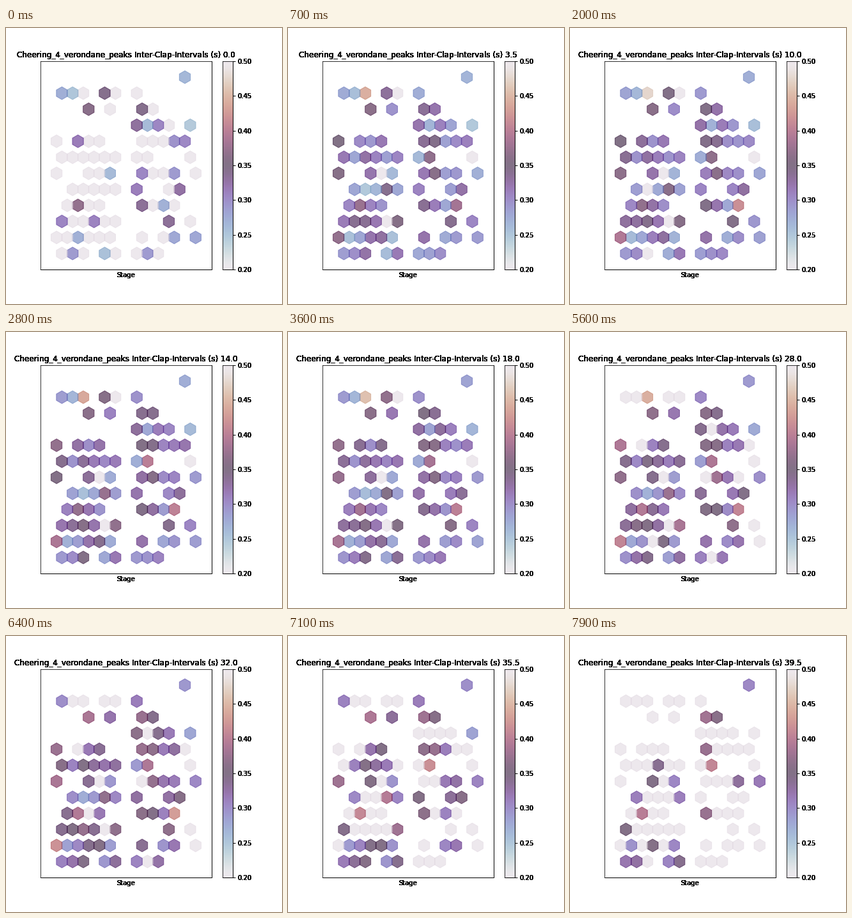
A matplotlib script that plays this animation: 432 px wide and 432 px high, repeating every 8400 ms.

```python
import numpy as np
import matplotlib.pyplot as plt
from matplotlib.animation import FuncAnimation

SIZE = 432
STEPS, HOLD = 80, 4          # the last picture is held for a few extra ticks
SILENT = 0.20
TITLE = "Cheering_4_verondane_peaks Inter-Clap-Intervals (s) "

# Hall layout, bottom row first: blocks of seats as first and last half-seat column.
HALL = [
    [(4, 8), (12, 14), (18, 22)],
    [(3, 13), (19, 19), (23, 25), (29, 29)],
    [(4, 14), (24, 24), (28, 28)],
    [(5, 11), (19, 25)],
    [(6, 14), (18, 18), (24, 26)],
    [(3, 3), (9, 13), (19, 25), (29, 29)],
    [(4, 14), (18, 20), (28, 28)],
    [(3, 3), (7, 11), (19, 27)],
    [(18, 24), (28, 28)],
    [(9, 9), (13, 13), (19, 21)],
    [(4, 8), (12, 14), (18, 18)],
    [(27, 27)],
]

rng = np.random.default_rng(12)
times = np.arange(STEPS) * 0.5


def clap_track():
    """Intervals of one listener: join in, slow down a little, drop out."""
    tempo = 0.25 + rng.gamma(3.3, 0.02)
    start = rng.uniform(0.2, 2.8) if rng.random() < 0.63 else 0
    fate = rng.random()
    if fate < 0.05:
        stop = 0
    elif fate < 0.25:
        stop = rng.uniform(18, 31)
    elif fate < 0.77:
        stop = rng.uniform(32.2, 39)
    else:
        stop = 40
    wobble = np.convolve(rng.normal(0, 0.08, STEPS + 2), [0.25, 0.5, 0.25], "valid")
    track = tempo + 0.001 * (times - 14) + wobble * (tempo - SILENT)
    clapping = (times >= start) & (times < stop) & (rng.random(STEPS) > 0.015)
    return np.where(clapping, track, SILENT)


# Drawn from right to left, so that each seat overlaps its right neighbour.
seats = np.array([(col, row)
                  for row, blocks in enumerate(HALL, 1)
                  for first, last in reversed(blocks)
                  for col in range(last, first - 1, -2)])
tracks = np.array([clap_track() for _ in seats])

plt.rcParams["font.family"] = "DejaVu Sans"
fig = plt.figure(figsize=(6, 6), dpi=72, facecolor="white")


def pixel_axes(x, y, w, h):
    return fig.add_axes([x / SIZE, y / SIZE, w / SIZE, h / SIZE])


def draw_frame(axes):
    """Left and top lines are slightly lighter than right and bottom."""
    for side, width in dict(left=0.8, top=0.8, right=1, bottom=1).items():
        axes.spines[side].set_visible(True)
        axes.spines[side].set_linewidth(width)


def heavy_text(x, y, text, size, **align):
    """Stack copies so that the antialiased rims turn black."""
    return [fig.text(x / SIZE, y / SIZE, text, fontsize=size, **align)
            for _ in range(12)]


ax = pixel_axes(54, 54, 267.84, 326.16)
ax.set(xlim=(0, 32), ylim=(0, 13), xticks=[], yticks=[])
draw_frame(ax)
hexes = ax.scatter(*seats.T, c=tracks[:, 0], s=400, marker="h", cmap="twilight",
                   vmin=0.2, vmax=0.5, alpha=0.6, linewidths=1)

cax = pixel_axes(338.58, 54, 16.31, 326.16)
bar = fig.colorbar(hexes, cax=cax, ticks=np.linspace(0.2, 0.5, 7))
bar.outline.set_visible(False)
draw_frame(cax)
cax.tick_params(width=1, labelright=False)
for i in range(7):
    heavy_text(361.9, 54 + 326.16 * i / 6, f"{0.2 + 0.05 * i:.2f}", 10,
               ha="left", va="center_baseline")
heavy_text(187.92, 50, "Stage", 10, ha="center", va="top")
titles = heavy_text(187.92, 386.16, TITLE, 12, ha="center", va="baseline")


def update(frame):
    step = min(frame, STEPS - 1)
    hexes.set_array(tracks[:, step])
    for title in titles:
        title.set_text(f"{TITLE}{times[step]:.1f}")
    return [hexes, *titles]


anim = FuncAnimation(fig, update, frames=STEPS + HOLD, interval=100,
                     repeat=True, repeat_delay=0, blit=False)
plt.show()
```
